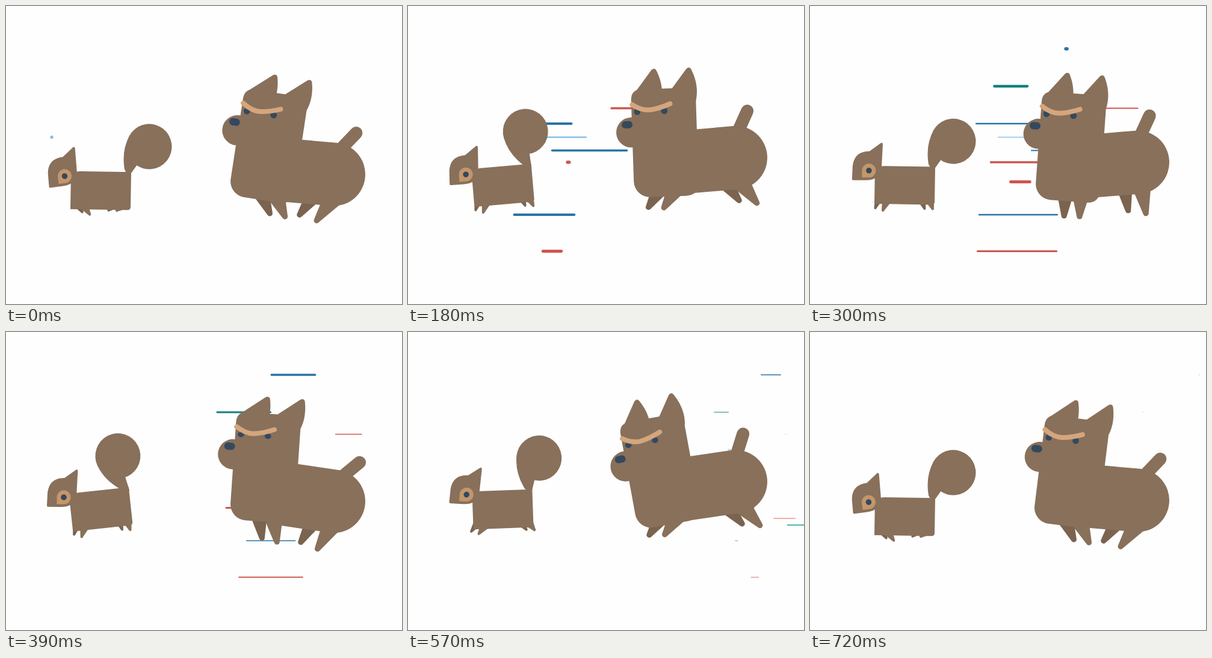
Recreate the animation shown at these times as an HTML page. Size 658 by 494 pixels, loop 0.75 s.

```html
<!DOCTYPE html>
<html lang="en">
<head>
<meta charset="utf-8">
<title>Chase</title>
<style>
html, body { margin: 0; width: 100%; height: 100%; overflow: hidden; background: #fefefe; }
svg { display: block; width: 100vw; height: 100vh; }
</style>
</head>
<body>
<svg id="stage" viewBox="0 0 658 494"></svg>
<script>
const LOOP = 750, STEP = 30, SCURRY = 240, RUN = 360;
const FUR = '#88705b', SHADE = '#7a634f', TAN = '#d5a57c', PATCH = '#c4966b', NAVY = '#34495e';
const BLUE = '#2874a6', SKY = '#85c1e9', RED = '#cd5650', TEAL = '#148080', GREEN = '#17a085', PINK = '#f1948a';
const RAD = Math.PI / 180;
const stage = document.getElementById('stage');

function set(el, attrs) {
  for (const k in attrs) el.setAttribute(k, attrs[k]);
}
function add(parent, tag, attrs = {}) {
  const el = document.createElementNS('http://www.w3.org/2000/svg', tag);
  set(el, attrs);
  return parent.appendChild(el);
}
const pair = fill => [0, 1].map(() => add(stage, 'path', { fill }));
const place = (el, [x, y], deg = 0) =>
  el.setAttribute('transform', `translate(${x} ${y}) rotate(${deg})`);

const plus = (p, q) => [p[0] + q[0], p[1] + q[1]];
function turn([x, y], deg) {
  const c = Math.cos(deg * RAD), s = Math.sin(deg * RAD);
  return [x * c - y * s, x * s + y * c];
}

// Cosine of the gait: wave(lag in degrees, harmonic)
const gait = (t, period) => (lag, n = 1) => Math.cos((n * 360 * t / period - lag) * RAD);

// Outline around two circles: a tapered leg
function limb(a, ra, b, rb) {
  const dx = b[0] - a[0], dy = b[1] - a[1];
  const dir = Math.atan2(dy, dx), open = Math.acos((ra - rb) / Math.hypot(dx, dy));
  const pt = (p, r, ang) => `${p[0] + r * Math.cos(ang)} ${p[1] + r * Math.sin(ang)}`;
  const l = dir + open, r = dir - open;
  return `M${pt(a, ra, l)}A${ra} ${ra} 0 1 1 ${pt(a, ra, r)}` +
    `L${pt(b, rb, r)}A${rb} ${rb} 0 0 1 ${pt(b, rb, l)}Z`;
}

// A near leg swinging from its hip, and the same leg shifted for the far side
function drawLeg(near, far, { hip, swing, length, thigh, foot, shift }) {
  const toe = plus(hip, turn([0, length], -swing));
  near.setAttribute('d', limb(hip, thigh, toe, foot));
  far.setAttribute('d', limb(plus(hip, shift), thigh - 1, plus(toe, shift), foot));
}

// Speed lines: colour, y, start time, start x, distance
const lines = [
  [SKY, 217.5, 0, 76, 375],
  [RED, 169.5, 50, 303, 325],
  [BLUE, 239.5, 65, 210, 375],
  [BLUE, 195, 105, 165, 375],
  [BLUE, 346, 105, 167, 385],
  [RED, 406.5, 160, 224, 370],
  [RED, 259, 178, 265, 330],
  [TEAL, 133, 246, 303, 250],
  [RED, 291.5, 274, 333, 270],
  [BLUE, 71, 298, 425, 222],
  [GREEN, 320, 330, 495, 205],
  [PINK, 309, 340, 490, 185]
].map(([stroke, y, start, x, dist]) => ({
  start, x, dist,
  life: 545 - 130 * (start / 340) ** 2,
  el: add(stage, 'line', { y1: y, y2: y, stroke, 'stroke-linecap': 'round' })
}));

function drawLine({ el, start, life, x, dist }, t) {
  const p = (t - start) / life;
  const on = p >= 0 && p < 1;
  el.setAttribute('visibility', on ? 'visible' : 'hidden');
  if (!on) return;
  const head = 1 - (1 - p) ** 2.2;
  const tail = head ** (3.1 - 1.2 * p);
  set(el, {
    x1: x + dist * tail,
    x2: x + dist * head + 0.01,
    'stroke-width': 0.6 + 4.7 * (1 - p) ** 2
  });
}

// Squirrel
const sqTail = add(stage, 'g', { fill: FUR });
add(sqTail, 'circle', { cy: -55, r: 37.5 });
add(sqTail, 'path', { d: 'M-37-50Q-33-22-9 0L4 6L3-17L0-55Z' });
const sqFar = pair(SHADE);
const sqBody = add(stage, 'path', { fill: FUR, d: 'M-50-17Q-48-31-34-31H50V27Q50 32 45 32H-50Z' });
const sqNear = pair(FUR);
const sqHead = add(stage, 'g');
add(sqHead, 'path', { fill: FUR, d: 'M-28 14L-27-8Q-24-32 1-32L19-45Q23-48 23-43L21-3Q18 16-5 16H-26Q-28 16-28 14Z' });
add(sqHead, 'path', { fill: PATCH, d: 'M-11.5 11.5V0A11.5 11.5 0 1 1 0 11.5Z' });
add(sqHead, 'circle', { r: 4.8, fill: NAVY });

function drawSquirrel(t) {
  const wave = gait(t, SCURRY);
  const mid = [157.5, 296.7 + 6.7 * wave(0) + 2.1 * wave(0, 3)];
  const tilt = -2 + 4.2 * wave(45);
  const joint = p => plus(mid, turn(p, tilt));
  place(sqBody, mid, tilt);
  place(sqTail, joint([46, -30]), 31 + 7.4 * tilt);
  place(sqHead, [97 + wave(60), 276 + 6.8 * wave(-28)], -2 + 5.8 * wave(159));

  drawLeg(sqNear[0], sqFar[0], {
    hip: joint([-29, 24]), swing: -6.5 + 28 * wave(-4) + 15 * wave(34, 2),
    length: 20, thigh: 8, foot: 2, shift: [-12.5, -4]
  });
  drawLeg(sqNear[1], sqFar[1], {
    hip: joint([41, 22]), swing: 3 - 36 * wave(6) - 23 * wave(32, 2),
    length: 18, thigh: 8, foot: 2, shift: [-13.5, -0.5]
  });
}

// Dog
const dogFar = pair(SHADE);
const dogBody = add(stage, 'g', { fill: FUR });
const dogTail = add(dogBody, 'line', { y2: -40.5, stroke: FUR, 'stroke-width': 21, 'stroke-linecap': 'round' });
add(dogBody, 'path', { d: 'M-95-52.5H0A52.5 52.5 0 0 1 0 52.5H-95Z' });
const dogNear = pair(FUR);
const dogHead = add(stage, 'g', { fill: FUR });
add(dogHead, 'path', { d: 'M-9.5-19Q-9.5-37 8-37H86Q98-37 98-25V120Q98 142 76 142H17A26.5 26.5 0 0 1-9.5 115.5Z' });
const ears = [0, 1].map(() => add(dogHead, 'path', { d: 'M-20 2L-4-45Q0-51 5-45Q25-24 27 2Z' }));
add(dogHead, 'circle', { cx: -11, cy: 34, r: 25 });
const eyes = [0, 45].map(cx => add(dogHead, 'ellipse', { cx, rx: 5.4, fill: NAVY }));
add(dogHead, 'path', {
  d: 'M-8-12Q8-1 22-2.5T55-11.5', fill: 'none', stroke: TAN, 'stroke-width': 8, 'stroke-linecap': 'round'
});
add(dogHead, 'rect', { x: -26.5, y: 15, width: 18, height: 12, rx: 6, fill: NAVY });

// Turn of the neck against the body: time, degrees
const neckKeys = [[0, 3.8], [60, 0.7], [180, 3], [300, 8.7], [450, -11.5], [570, -2.1], [LOOP, 2.5]];
function neckTurn(t) {
  const i = neckKeys.findIndex(k => k[0] > t);
  const [t0, a] = neckKeys[i - 1], [t1, b] = neckKeys[i];
  const u = (t - t0) / (t1 - t0);
  return a + (b - a) * u * u * (3 - 2 * u);
}

function drawDog(t) {
  const wave = gait(t, RUN);
  const mid = [544.5, 262 + 16.3 * wave(32) + 3.3 * wave(15, 2)];
  const tilt = 9.5 * wave(59);
  const joint = p => plus(mid, turn(p, tilt));
  place(dogBody, mid, tilt);
  place(dogTail, [6, -40], 34 + tilt);

  drawLeg(dogNear[0], dogFar[0], {
    hip: joint([-97, 34]), swing: -17.5 + 28 * wave(-12) + 13 * wave(-10, 2),
    length: 48, thigh: 17, foot: 4.6, shift: turn([-25.5, -3], tilt)
  });
  drawLeg(dogNear[1], dogFar[1], {
    hip: joint([3, 38]), swing: 12.6 - 38 * wave(14) - 12 * wave(6, 2),
    length: 47.5, thigh: 16, foot: 4.6, shift: turn([-29, -7], tilt)
  });

  const neck = neckTurn(t), angle = tilt + neck;
  const chest = plus(joint([-137, 14]), [12, 13]);
  place(dogHead, plus(chest, turn([-36.5, -116], angle)), angle);
  ears.forEach((ear, i) => place(ear, [15 + 58 * i, -25], 25 + 1.15 * tilt));
  const lid = 1 + Math.min(0, neck) / 23;
  eyes.forEach(eye => set(eye, { ry: 5.4 * lid, cy: 2 * (1 - lid) }));
}

function draw(ms) {
  const t = Math.floor(ms % LOOP / STEP) * STEP;
  lines.forEach(line => drawLine(line, t));
  drawSquirrel(t);
  drawDog(t);
}

const begin = performance.now();
function tick() {
  draw(performance.now() - begin);
  requestAnimationFrame(tick);
}
tick();
</script>
</body>
</html>
```
